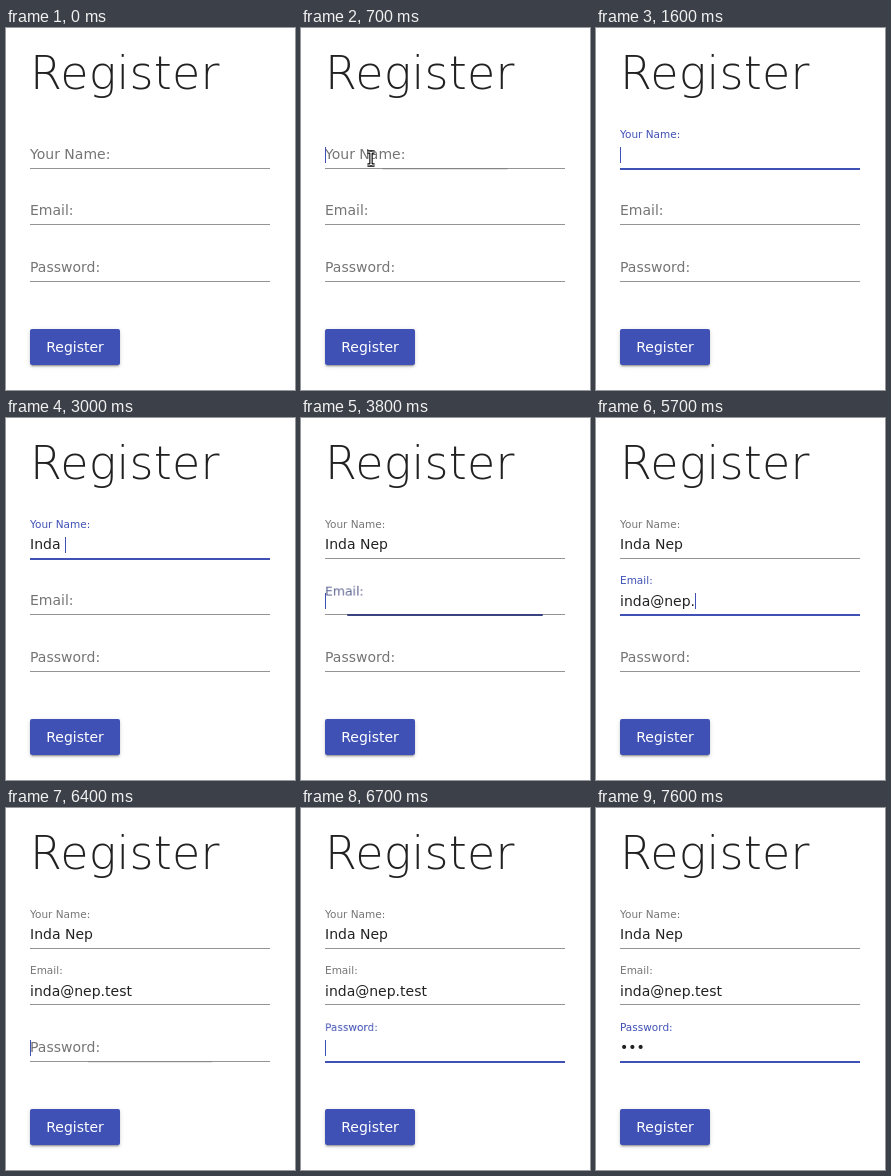
Write an HTML page that moves like this. It is 289 px wide and 362 px high and loops after 8000 ms.

```html
<!DOCTYPE html>
<html lang="en">
<head>
<meta charset="utf-8">
<title>Register</title>
<style>
  html, body { margin: 0; width: 100%; height: 100%; overflow: hidden; background: #fff; }
  body { position: relative; font: 14px/16px "DejaVu Sans", sans-serif; color: rgba(0, 0, 0, .87); }
  h1, .field, .field *, button, svg { position: absolute; }
  h1 { left: 24px; top: 21px; margin: 0; font-size: 46px; line-height: 48px; font-weight: 200; letter-spacing: .005em; }
  .field { left: 24px; width: 240px; }
  .line { top: 0; width: 240px; height: 1px; background: rgba(0, 0, 0, .42); }
  .ripple { top: 0; width: 240px; height: 2px; }
  .label { top: -22px; white-space: pre; transform-origin: 0 0; }
  .value { top: -21.6px; white-space: pre; }
  .caret { top: -21px; width: 1px; height: 16px; background: #3f51b5; }
  button {
    left: 24px; top: 301px; width: 90px; height: 36px; padding: 0; border: 0; border-radius: 2px;
    background: #3f51b5; color: #fff; font: inherit;
    box-shadow: 0 3px 1px -2px rgba(0, 0, 0, .2), 0 2px 2px rgba(0, 0, 0, .14), 0 1px 5px rgba(0, 0, 0, .12);
  }
  svg { left: 0; top: 0; }
</style>
</head>
<body>
<h1>Register</h1>
<button>Register</button>
<svg width="289" height="362">
  <path id="arrow" d="M0 0V15L3.5 11.7L6 17L8.2 16L5.8 10.8H10.5Z" fill="#fff" stroke="#000"/>
  <g id="beam" fill="none">
    <path d="M-3.5 -6.5H-1L0 -5.5L1 -6.5H3.5M0 -6V6M-3.5 6.5H-1L0 5.5L1 6.5H3.5" stroke="#000" stroke-width="3.4"/>
    <path d="M-3.5 -6.5H-1L0 -5.5L1 -6.5H3.5M0 -6V6M-3.5 6.5H-1L0 5.5L1 6.5H3.5" stroke="#fff" stroke-width="1.2"/>
  </g>
</svg>
<script>
const LOOP = 8000;
const FIRST_LINE = 140, FIELD_PITCH = 56.25;
const GREY = [117, 117, 117], INK = [33, 33, 33], BLUE = [63, 81, 181];

// keys: [time, text, caret hidden]; each entry restarts the caret blink
const fields = [
  { label: 'Your Name:', focus: 697, blur: 3738, keys: [
    [400, ''], [2200, 'I'], [2500, 'In'], [2800, 'Inda'], [3000, 'Inda '], [3100, 'Inda ', true],
    [3300, 'Inda N'], [3400, 'Inda Ne'], [3700, 'Inda Nep']] },
  { label: 'Email:', focus: 3738, blur: 6300, keys: [
    [3700, ''], [4500, 'inda'], [4900, 'inda', true], [5000, 'inda@'], [5200, 'inda@n'], [5400, 'inda@nep'],
    [5700, 'inda@nep.'], [6100, 'inda@nep.te'], [6200, 'inda@nep.test']] },
  { label: 'Password:', focus: 6398, blur: LOOP, keys: [
    [6398, ''], [6600, ''], [7000, '••'], [7100, '•••']] }
];

const clamp = v => Math.min(1, Math.max(0, v));
const mix = (a, b, p) => `rgb(${a.map((v, i) => v + (b[i] - v) * p)})`;

// Eased progress along cubic-bezier(.25, .8, .25, 1)
function swift(x) {
  if (x <= 0 || x >= 1) return clamp(x);
  const at = (a, b, s) => 3 * (1 - s) ** 2 * s * a + 3 * (1 - s) * s * s * b + s ** 3;
  let lo = 0, hi = 1;
  for (let i = 0; i < 24; i++) {
    const mid = (lo + hi) / 2;
    if (at(.25, .25, mid) < x) lo = mid; else hi = mid;
  }
  return at(.8, 1, lo);
}

fields.forEach((f, i) => {
  const box = document.createElement('div');
  box.className = 'field';
  box.style.top = FIRST_LINE + FIELD_PITCH * i + 'px';
  f.el = {};
  for (const part of ['line', 'ripple', 'label', 'value', 'caret']) {
    f.el[part] = box.appendChild(document.createElement('div'));
    f.el[part].className = part;
  }
  f.el.label.textContent = f.label;
  document.body.insertBefore(box, document.querySelector('svg'));
});

function drawField(f, t) {
  const { ripple, label, value, caret } = f.el;
  const age = t - f.focus, focused = age >= 0 && t < f.blur;

  // The label starts slightly after the underline and is a soft layer while it moves
  const lift = swift((age - 8) / 392);
  label.style.willChange = age >= 0 && lift < 1 ? 'transform' : 'auto';
  label.style.transform = `translateY(${-17.94 * lift}px) scale(${1 - .25 * lift})`;
  label.style.color = mix(GREY, BLUE, focused ? lift : 0);

  const spread = swift(age / 300);
  ripple.style.opacity = focused ? swift(age / 100) : 0;
  ripple.style.transform = `scaleX(${.5 + .5 * spread})`;
  ripple.style.background = mix(INK, BLUE, spread);

  const [time, text, hidden] = f.keys.filter(k => k[0] <= t).pop() || [0, ''];
  if (value.textContent !== text) value.textContent = text;
  const lit = focused && !hidden && (t - time) % 1000 < 500;
  caret.style.visibility = lit ? 'visible' : 'hidden';
  caret.style.left = Math.round(value.getBoundingClientRect().width) + 'px';
}

function place(id, shown, x, y) {
  const el = document.getElementById(id);
  el.style.display = shown ? '' : 'none';
  el.setAttribute('transform', `translate(${x} ${y})`);
}

function draw() {
  const t = performance.now() % LOOP;
  fields.forEach(f => drawField(f, t));
  place('arrow', t >= 400 && t < 500, 9.5, 122);
  if (t < 1300) place('beam', t >= 500, 70, 130.5);
  else place('beam', t < 1400, 78, 140);
  requestAnimationFrame(draw);
}
draw();
</script>
</body>
</html>
```
